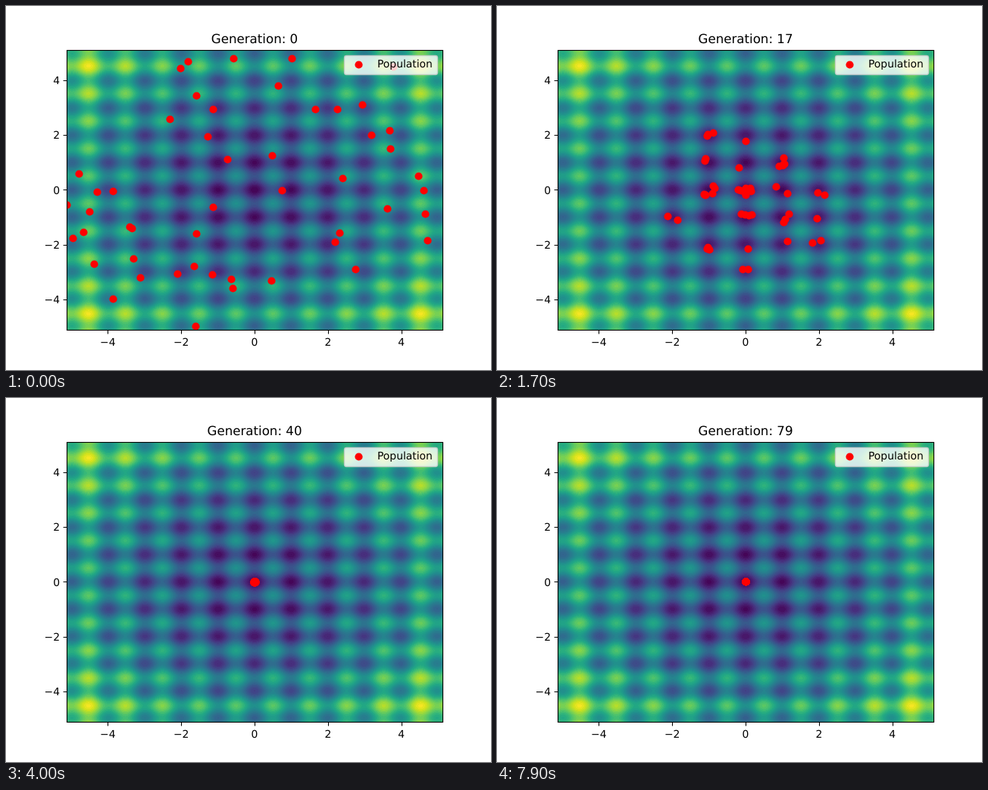
These frames come from a looping animation (640x480 px, 8 s). An HTML page with a canvas:

```html
<!DOCTYPE html>
<html lang="en">
<head>
<meta charset="utf-8">
<title>Population search</title>
<style>
  html, body { margin: 0; width: 100%; height: 100%; overflow: hidden; background: #fff; }
  #stage { position: relative; width: 640px; height: 480px; }
  canvas { position: absolute; left: 80px; top: 58px; }
  svg { position: absolute; left: 0; top: 0; }
  text { font: 13.89px "DejaVu Sans", sans-serif; text-rendering: geometricPrecision; }
  #title { font-size: 16.67px; }
  .mid { text-anchor: middle; }
  .end { text-anchor: end; }
  .dot { fill: #f00; }
  .line { fill: none; stroke: #000; stroke-width: 1.1; }
  .legend { fill: #fff; fill-opacity: .8; stroke: #ccc; stroke-opacity: .8; stroke-width: 1.39; }
</style>
</head>
<body>
<div id="stage">
  <canvas id="field" width="497" height="370"></canvas>
  <svg width="640" height="480" viewBox="0 0 640 480">
    <clipPath id="plot"><rect x="80" y="57.6" width="496" height="369.6"/></clipPath>
    <g id="dots" clip-path="url(#plot)"></g>
    <g id="axes"><rect class="line" x="80.5" y="58.5" width="496" height="369"/></g>
    <rect class="legend" x="446.5" y="65.5" width="123" height="25" rx="2.8"/>
    <circle class="dot" cx="465.5" cy="77.5" r="5.1"/>
    <text x="490" y="81">Population</text>
    <text id="title" class="mid" x="328" y="49"></text>
  </svg>
</div>
<script>
const CX = 328, CY = 242.4, SX = 48.4375, SY = 36.094, LIMIT = 5.12;
const GENERATIONS = 80, STEP_MS = 100, MEMBERS = 50, SETTLED = 55;
const byId = id => document.getElementById(id);
const toX = x => CX + x * SX, toY = y => CY - y * SY;
const snap = v => Math.round(v) + 0.5;

function add(parent, tag, attrs, text = '') {
  const el = document.createElementNS('http://www.w3.org/2000/svg', tag);
  for (const key in attrs) el.setAttribute(key, attrs[key]);
  el.textContent = text;
  return parent.appendChild(el);
}

// Filled contours of the Rastrigin function in bands of 2.
function drawField() {
  const stops = ('440154 481a6c 472f7d 414487 39568c 31688e 2a788e 23888e ' +
    '1f988b 22a884 35b779 54c568 7ad151 a5db36 d2e21b fde725')
    .split(' ').map(h => [0, 2, 4].map(i => parseInt(h.slice(i, i + 2), 16)));
  const shade = v => {
    const p = Math.min(v, 0.9999) * (stops.length - 1), i = Math.floor(p);
    return stops[i].map((c, k) => c + (stops[i + 1][k] - c) * (p - i));
  };
  const bands = Array.from({ length: 41 }, (_, i) => shade((2 * i + 1) / 82));
  const wave = x => 10 + x * x - 10 * Math.cos(2 * Math.PI * x);
  const canvas = byId('field'), ctx = canvas.getContext('2d');
  const { width, height } = canvas, img = ctx.createImageData(width, height);
  for (let y = 0; y < height; y++) {
    const fy = wave((y + 58.5 - CY) / SY);
    for (let x = 0; x < width; x++) {
      const f = fy + wave((x + 80.5 - CX) / SX);
      const band = bands[Math.min(40, Math.floor(f / 2))];
      img.data.set([...band, 255], (y * width + x) * 4);
    }
  }
  ctx.putImageData(img, 0, 0);
}

function drawAxes() {
  const axes = byId('axes');
  for (let v = -4; v <= 4; v += 2) {
    const label = String(v).replace('-', '\u2212');
    add(axes, 'path', { class: 'line', d: `M${snap(toX(v))} 427.5v4.9M80.5 ${snap(toY(v))}h-4.9` });
    add(axes, 'text', { class: 'mid', x: toX(v), y: 448 }, label);
    add(axes, 'text', { class: 'end', x: 71, y: Math.round(toY(v) + 5.27) }, label);
  }
}

let seed = 11;
function random() {
  seed = (seed * 16807) % 2147483647;
  return seed / 2147483647;
}
const pick = n => Math.floor(n * random());
const around = size => size * (2 * random() - 1);

// Minima the population settles in; the last ones are abandoned first.
const wells = [
  [0, 0], [0, -1], [0, 1], [1, 0], [-1, 0], [1, -1], [1, 1], [-1, 1], [0, 2],
  [0, -2], [-1, 2], [-1, -2], [2, 0], [2, -2], [1, -2], [2, -1], [-2, -1], [0, -3]
];

// A spot close to a minimum, closer in later generations.
function near([x, y], gen) {
  const size = 0.35 * (1 - gen / SETTLED) ** 2.5;
  return { gen, at: [x + around(size), y + around(size)] };
}

// Scatter, try a loose minimum, take a home, then move inwards and refine.
function planMember(index) {
  let k = index < wells.length ? index : Math.floor(wells.length * random() ** 2);
  const [x, y] = wells[k];
  const jumps = [
    { gen: 0, at: [around(LIMIT), around(LIMIT)] },
    near([x + pick(5) - 2, y + pick(3) - 1], 1 + pick(8)),
    near(wells[k], 10 + pick(8))
  ];
  let gen = 17;
  while (k > 0) {
    gen = Math.max(gen + 1, 39 - k - pick(3));
    k = pick(k);
    jumps.push(near(wells[k], gen));
  }
  for (gen += 3; gen < SETTLED; gen += 3) jumps.push(near(wells[0], gen));
  jumps.push(near(wells[0], SETTLED));
  return jumps;
}

drawField();
drawAxes();
const members = Array.from({ length: MEMBERS }, (_, i) => planMember(i));
const dots = members.map(() => add(byId('dots'), 'circle', { class: 'dot', r: 5.1 }));
let shown = -1;

function show(gen) {
  byId('title').textContent = 'Generation: ' + gen;
  members.forEach((jumps, i) => {
    const [x, y] = jumps.filter(j => j.gen <= gen).pop().at;
    dots[i].setAttribute('cx', snap(toX(x)));
    dots[i].setAttribute('cy', snap(toY(y)));
  });
}

function tick() {
  const gen = Math.floor(performance.now() / STEP_MS) % GENERATIONS;
  if (gen !== shown) show(shown = gen);
  requestAnimationFrame(tick);
}
tick();
</script>
</body>
</html>
```
